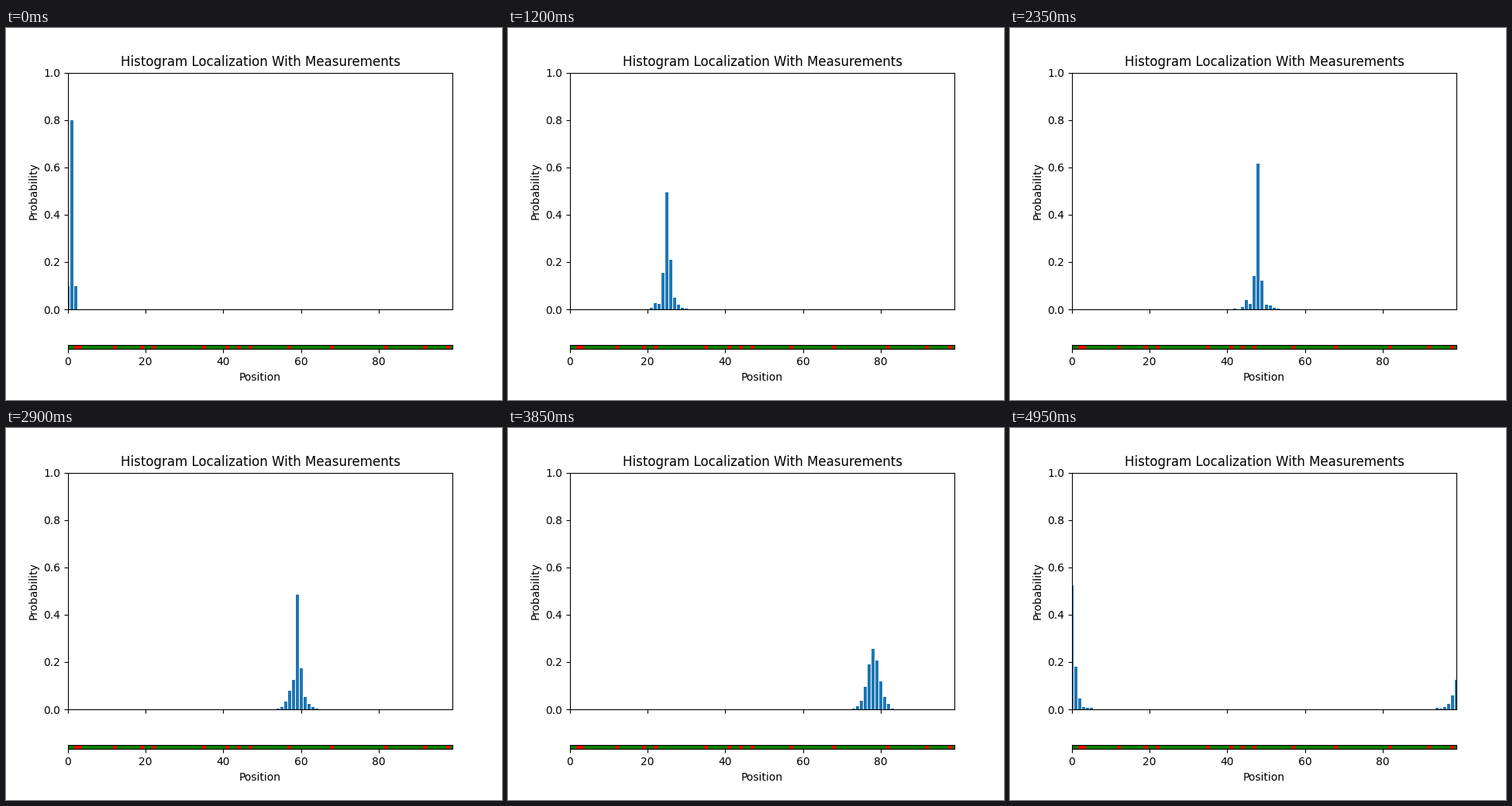
Recreate the animation shown at these times as a matplotlib script. Size 640 by 480 pixels, loop 5000 ms.

```python
import numpy as np
import matplotlib.pyplot as plt
from matplotlib.animation import FuncAnimation
from matplotlib.colors import ListedColormap

CELLS = 100
MARKERS = [2, 3, 12, 19, 22, 35, 41, 44, 47, 57, 68, 82, 92, 98]
P_HIT, P_MISS = 0.6, 0.2
P_EXACT, P_SLIP = 0.8, 0.1

world = np.zeros(CELLS, dtype=int)
world[MARKERS] = 1


def sense(belief, reading):
    weighted = belief * np.where(world == reading, P_HIT, P_MISS)
    return weighted / weighted.sum()


def move(belief):
    """Shift one cell right on a cyclic track, with a chance of slipping."""
    return (P_EXACT * np.roll(belief, 1)
            + P_SLIP * (belief + np.roll(belief, 2)))


def run_filter():
    belief = np.zeros(CELLS)
    belief[0] = 1.0
    history = []
    for position in range(CELLS):
        belief = move(sense(belief, world[position]))
        history.append(belief)
    return history


beliefs = run_filter()

fig, (ax, track) = plt.subplots(
    2, 1, sharex=True, figsize=(6.4, 4.8), dpi=100,
    gridspec_kw={"height_ratios": [10, 1]})

bars = ax.bar(np.arange(CELLS), beliefs[0], color="C0")
ax.set_title("Histogram Localization With Measurements")
ax.set_ylabel("Probability")
ax.set_ylim(0, 1)

track.imshow(world[np.newaxis, :], cmap=ListedColormap(["green", "red"]))
track.yaxis.set_visible(False)
track.set_xlabel("Position")
track.set_xlim(0, CELLS - 1)


def update(step):
    for bar, height in zip(bars, beliefs[step]):
        bar.set_height(height)
    return bars.patches


anim = FuncAnimation(fig, update, frames=CELLS, interval=50,
                     repeat=True, repeat_delay=0)
plt.show()
```
